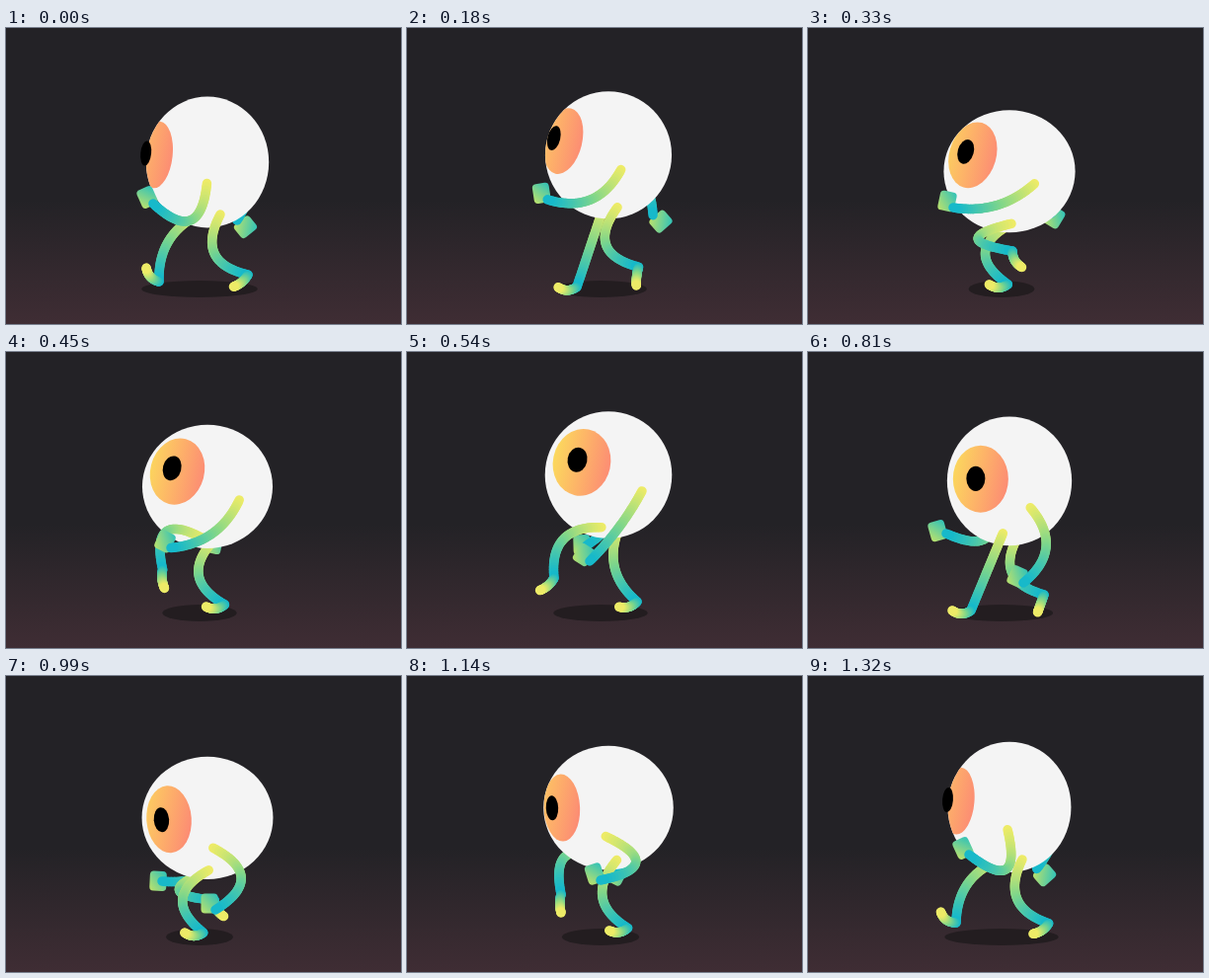
An HTML page with a canvas for the animation above (1.35 s loop, 400 by 300 pixels).

```html
<!DOCTYPE html>
<html lang="en">
<head>
<meta charset="utf-8">
<title>Walking eyeball</title>
<style>
  html, body { margin: 0; width: 100%; height: 100%; overflow: hidden; background: #232226; }
  canvas { display: block; width: 400px; height: 300px; }
</style>
</head>
<body>
<canvas id="stage"></canvas>
<script>
const LOOP = 1350, STEP = 30, CX = 204;
const ARM = 89, LEG = 84, FOOT = 19;
const YELLOW = [240, 236, 102], GREEN = [128, 214, 138], TEAL = [20, 184, 204];

const canvas = document.getElementById('stage');
const ctx = canvas.getContext('2d');
const ratio = window.devicePixelRatio || 1;
canvas.width = 400 * ratio;
canvas.height = 300 * ratio;
ctx.scale(ratio, ratio);

// Key points of the free limb ends: time, x, y (and foot angle, toe up is positive)
const anklePath = [
  [0, 155, 257, 47], [135, 165, 262, 0], [322, 201, 260, 0],
  [540, 233, 253, -16], [675, 245, 250, -40], [810, 239, 246, -70],
  [1005, 207, 226, -120], [1140, 156, 221, -90], [1320, 150, 250, 35]
];
const nearWristPath = [
  [0, 149, 178], [330, 147, 182], [540, 185, 212], [810, 218, 234],
  [990, 212, 237], [1140, 196, 207], [1320, 163, 181]
];
const farWristPath = [
  [0, 234, 195], [330, 246, 188], [540, 182, 196],
  [810, 140, 184], [990, 158, 208], [1140, 210, 198]
];

const mod = (a, n) => ((a % n) + n) % n;
const rad = deg => deg * Math.PI / 180;
// Cosine over the loop that peaks at the given angle
const wave = (time, peak, beats = 1) => Math.cos(rad(beats * time / LOOP * 360 - peak));

// Smooth closed curve through key points, with limited overshoot
function follow(keys, time) {
  const n = keys.length, t = mod(time, LOOP);
  const value = (j, c) => keys[mod(j, n)][c];
  const at = j => value(j, 0) + Math.floor(j / n) * LOOP;
  const slope = (j, c) => (value(j + 1, c) - value(j, c)) / (at(j + 1) - at(j));
  const tangent = (j, c) => {
    const h1 = at(j) - at(j - 1), h2 = at(j + 1) - at(j);
    const s1 = slope(j - 1, c), s2 = slope(j, c);
    const limit = 1.5 * Math.min(Math.abs(s1), Math.abs(s2)) + 0.06;
    return Math.max(-limit, Math.min(limit, (h2 * s1 + h1 * s2) / (h1 + h2)));
  };
  let i = n - 1;
  while (keys[i][0] > t) i--;
  const h = at(i + 1) - at(i), u = (t - at(i)) / h, v = 1 - u;
  return keys[i].slice(1).map((a, k) => {
    const c = k + 1;
    return a * v * v * (1 + 2 * u) + value(i + 1, c) * u * u * (1 + 2 * v) +
      h * u * v * (tangent(i, c) * v - tangent(i + 1, c) * u);
  });
}

function mix(a, b, u) {
  return `rgb(${a.map((v, i) => Math.round(v + (b[i] - v) * u))})`;
}

const limbColor = u => u < 0.5 ? mix(YELLOW, GREEN, u * 2) : mix(GREEN, TEAL, u * 2 - 1);

function gradient(x0, y0, x1, y1, ...colors) {
  const g = ctx.createLinearGradient(x0, y0, x1, y1);
  colors.forEach((c, i) => g.addColorStop(i / (colors.length - 1), c));
  return g;
}

function ellipse(x, y, rx, ry, tilt, fill) {
  ctx.beginPath();
  ctx.ellipse(x, y, rx, ry, rad(tilt), 0, Math.PI * 2);
  ctx.fillStyle = fill;
  ctx.fill();
}

// Arc from one point to another, bulging sideways by a distance; colour runs along it
function bow(x0, y0, x1, y1, bulge, color) {
  const dx = x1 - x0, dy = y1 - y0, k = 2 * bulge / Math.hypot(dx, dy);
  const cx = (x0 + x1) / 2 + dy * k, cy = (y0 + y1) / 2 - dx * k;
  const curve = (a, c, b, u) => (1 - u) ** 2 * a + 2 * u * (1 - u) * c + u * u * b;
  const point = u => [curve(x0, cx, x1, u), curve(y0, cy, y1, u)];
  const steps = 36;
  ctx.lineWidth = 9.5;
  ctx.lineCap = 'round';
  for (let i = 0; i < steps; i++) {
    ctx.beginPath();
    ctx.moveTo(...point(i / steps));
    ctx.lineTo(...point((i + 1) / steps));
    ctx.strokeStyle = color((i + 0.5) / steps);
    ctx.stroke();
  }
}

// A limb keeps its length, so it bends more when its ends come closer
function limb(x0, y0, x1, y1, length, side) {
  const slack = length ** 2 - (x1 - x0) ** 2 - (y1 - y0) ** 2;
  bow(x0, y0, x1, y1, side * Math.sqrt(3 * Math.max(0, slack)) / 4, limbColor);
}

function drawLeg(time, cy) {
  const [ax, ay, angle] = follow(anklePath, time);
  const hipX = 206 + 11 * wave(time, 178);
  const toeX = ax - FOOT * Math.cos(rad(angle)), toeY = ay - FOOT * Math.sin(rad(angle));
  limb(hipX, cy + 53, ax, ay, LEG, -1);
  bow(ax, ay, toeX, toeY, 3.5 * Math.cos(rad(angle - 20)), u => limbColor(1 - u));
}

function drawHand(x, y, tilt) {
  ctx.save();
  ctx.translate(x, y);
  ctx.rotate(rad(tilt));
  ctx.beginPath();
  ctx.roundRect(-8.5, -10, 17, 20, 4);
  ctx.fillStyle = gradient(-8, 7, 8, -7, '#b4e070', '#38c4b4');
  ctx.fill();
  ctx.restore();
}

function drawNearArm(time, cy) {
  const [x, y] = follow(nearWristPath, time);
  drawHand(x - 6, y - 6.5, 5 + 30 * wave(time, 165));
  limb(219 + 19 * wave(time, 145), cy + 21.5 - 9 * wave(time, 90), x, y, ARM, 1);
}

function drawFarArm(time, cy) {
  const [x, y] = follow(farWristPath, time);
  const swing = wave(time, 20);
  drawHand(x + 9 * swing, y + 2 + 5 * swing, 18 + 35 * swing);
  limb(189 - 19 * wave(time, 145), cy + 21.5 + 9 * wave(time, 90), x, y, ARM, 1);
}

function drawEye(time, cy) {
  const squash = 2.3 * wave(time, 195, 2);
  const turn = wave(time, 172), nod = wave(time, 90);
  const tilt = 6 + 10 * nod;
  ellipse(CX, cy, 64.4 + squash, 64.2 - squash, 0, '#f4f4f4');

  ctx.save();
  ctx.clip();
  const x = CX - 38.5 + 13 * turn, y = cy - 7.5 - 9 * nod, rx = 23 + 7 * turn;
  ellipse(x, y, rx, 34, tilt,
    gradient(x + rx - 60, y - 6, x + rx, y + 6, '#fbdc5c', '#fdb468', '#fc8c74'));
  ctx.restore();
  ellipse(CX - 46 + 16.5 * turn, cy - 9 - 11 * nod, 7.8 + 2.4 * turn, 12.6, tilt, '#000');
}

function drawBackground() {
  ctx.fillStyle = gradient(0, 174, 0, 300, '#232226', '#3f2d34');
  ctx.fillRect(0, 0, 400, 300);
}

function draw(time) {
  const cy = 134.5 - 5 * wave(time, -10, 2) + 7.5 * wave(time, 31, 4);
  drawBackground();
  ellipse(196, 264.5, 46 + 13 * wave(time, 10, 2), 8.5, 0, '#231d20');
  drawFarArm(time, cy);
  drawLeg(time, cy);
  drawEye(time, cy);
  drawLeg(time + LOOP / 2, cy);
  drawNearArm(time, cy);
}

const start = performance.now();
function tick() {
  const time = (performance.now() - start) % LOOP;
  draw(Math.floor(time / STEP) * STEP);
  requestAnimationFrame(tick);
}
tick();
</script>
</body>
</html>
```
